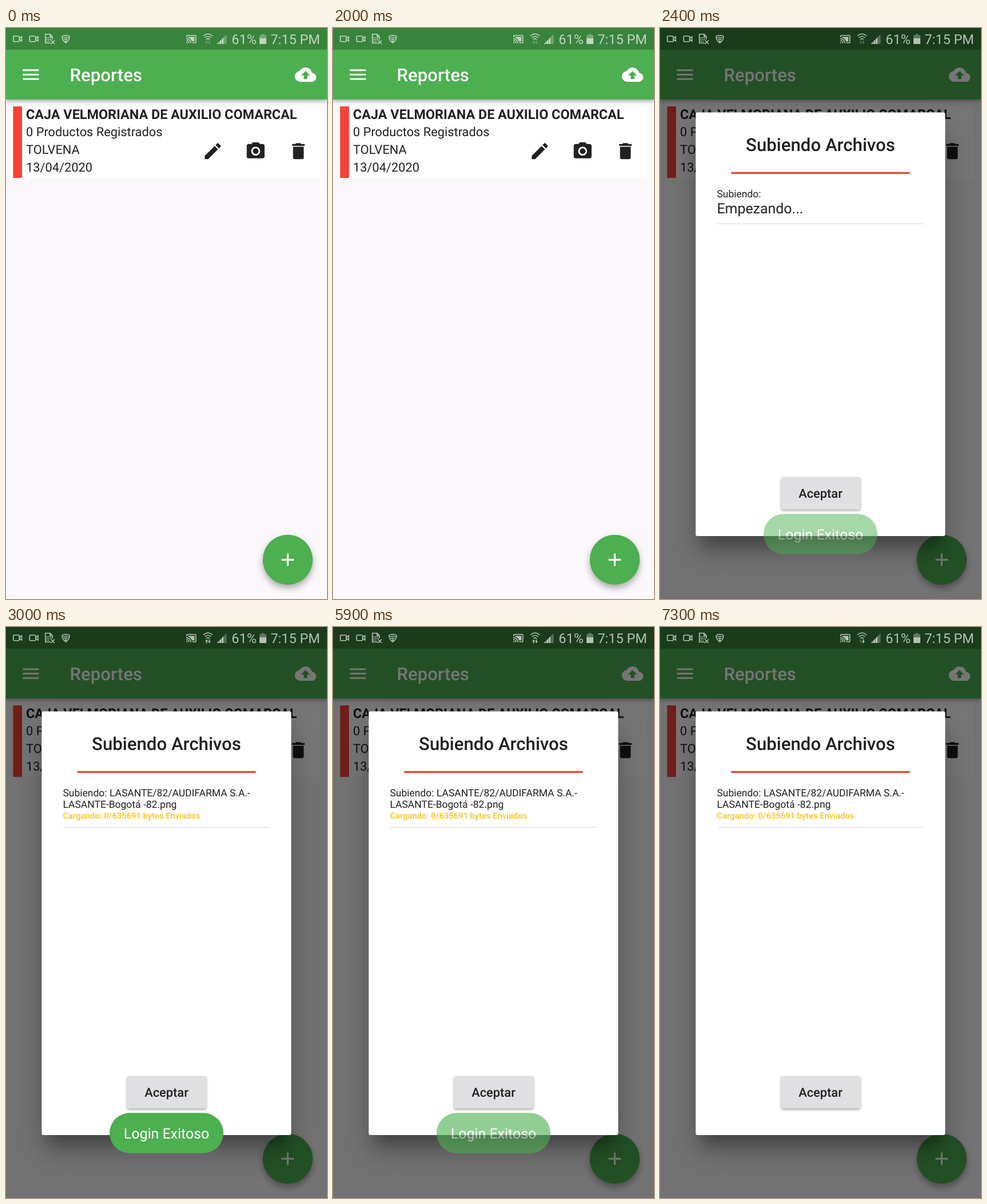
Animation of 561x998 px, one loop 8000 ms. Source, as an HTML page:

```html
<!DOCTYPE html>
<html lang="es">
<head>
<meta charset="utf-8">
<title>Reportes</title>
<style>
  html, body { margin: 0; width: 100%; height: 100%; overflow: hidden; background: #faf8fb; }
  svg { display: block; width: 561px; height: 998px; }
  text { font: 400 21.8px Roboto, sans-serif; fill: #212022; text-rendering: geometricPrecision; }
  .head { font-size: 31.16px; font-weight: 500; }
  .name { font-size: 23.37px; font-weight: 700; }
  .big { font-size: 24.93px; }
  .path { font-size: 17.5px; }
  .bytes { font-size: 14.8px; font-weight: 500; fill: #f9c51f; }
  .action { font-weight: 500; }
  .light, .light text { fill: #fff; }
  .dark { fill: #212022; }
  .status { fill: #fff; opacity: .68; }
  .status text { font-size: 23.5px; fill: #fff; }
  .line { fill: none; stroke: #fff; stroke-width: 1.6; }
  .bar { filter: drop-shadow(0 3px 3px rgba(0, 0, 0, .32)); }
  .fab { filter: drop-shadow(0 6px 6px rgba(0, 0, 0, .32)); }
  .button { filter: drop-shadow(0 2px 2px rgba(0, 0, 0, .36)); }

  /* 1.25% of the loop is 100 ms */
  .modal, .start, .upload, .toast, .ripple, .up, .down {
    opacity: 0;
    animation: 8s step-end infinite;
  }
  .modal { animation-name: modal; }
  .start { animation-name: start; }
  .upload { animation-name: upload; }
  .toast { animation-name: toast; }
  .ripple { animation-name: ripple; }
  .up { animation-name: up; }
  .down { animation-name: down; }
  @keyframes modal { 0% { opacity: 0 } 26.25%, 100% { opacity: 1 } }
  @keyframes start { 0% { opacity: 1 } 31.25%, 100% { opacity: 0 } }
  @keyframes upload { 0% { opacity: 0 } 31.25%, 100% { opacity: 1 } }
  @keyframes ripple {
    0% { opacity: 0 } 26.25% { opacity: .12 } 27.5% { opacity: .06 } 28.75%, 100% { opacity: 0 }
  }
  @keyframes toast {
    0% { opacity: 0 }
    28.75% { opacity: .2 } 30% { opacity: .5 } 31.25% { opacity: .75 } 32.5% { opacity: .92 } 33.75% { opacity: 1 }
    70% { opacity: .99 } 71.25% { opacity: .92 } 72.5% { opacity: .79 } 73.75% { opacity: .61 }
    75% { opacity: .33 } 76.25%, 100% { opacity: 0 }
  }
  @keyframes up {
    0% { opacity: .35 } 37.5% { opacity: 1 } 62.5% { opacity: .35 } 66.25% { opacity: 1 } 80%, 100% { opacity: .35 }
  }
  @keyframes down { 0% { opacity: .35 } 37.5%, 100% { opacity: 1 } }
</style>
</head>
<body>
<svg viewBox="0 0 561 998">
  <defs>
    <filter id="soft" x="-30%" y="-30%" width="160%" height="160%"><feGaussianBlur stdDeviation="26"/></filter>
    <filter id="near" x="-30%" y="-30%" width="160%" height="160%"><feGaussianBlur stdDeviation="11"/></filter>
    <clipPath id="barClip"><path d="M0 38H561V125H0z"/></clipPath>
    <g id="video">
      <rect class="line" x=".8" y="14.3" width="10.4" height="9.4" rx="1"/>
      <path class="line" d="M11.4 18 15.4 15v8l-4-3"/>
    </g>
  </defs>

  <!-- page -->
  <path fill="#faf8fb" d="M0 0H561V998H0z"/>
  <path class="bar" fill="#4caf50" d="M0 38H561V125H0z"/>
  <path fill="#39843c" d="M0 0H561V38H0z"/>
  <g clip-path="url(#barClip)"><circle class="ripple light" cx="523.5" cy="81.5" r="53"/></g>
  <g class="light">
    <path transform="translate(24.8 62.8) scale(1.558)" d="M3 18h18v-2H3v2zm0-5h18v-2H3v2zm0-7v2h18V6H3z"/>
    <text class="head" x="111.6" y="93">Reportes</text>
    <path transform="translate(504.8 62.8) scale(1.558)" d="M19.35 10.04C18.67 6.59 15.64 4 12 4 9.11 4 6.6 5.64 5.35 8.04 2.34 8.36 0 10.91 0 14c0 3.31 2.69 6 6 6h13c2.76 0 5-2.24 5-5 0-2.64-2.05-4.78-4.65-4.96zM14 13v4h-4v-4H7l5-5 5 5h-3z"/>
  </g>

  <!-- report card -->
  <path fill="#fff" d="M28 137H549V262H28z"/>
  <path fill="#f44336" d="M12.4 137H28V262H12.4z"/>
  <text class="name" x="35" y="159.3">CAJA VELMORIANA DE AUXILIO COMARCAL</text>
  <text x="35" y="189">0 Productos Registrados</text>
  <text x="35" y="220">TOLVENA</text>
  <text x="35" y="251.2">13/04/2020</text>
  <g class="dark">
    <path transform="translate(342.7 196.6) scale(1.558)" d="M3 17.25V21h3.75L17.81 9.94l-3.75-3.75L3 17.25zM20.71 7.04c.39-.39.39-1.02 0-1.41l-2.34-2.34c-.39-.39-1.02-.39-1.41 0l-1.83 1.83 3.75 3.75 1.83-1.83z"/>
    <g transform="translate(417.6 196.6) scale(1.558)">
      <circle cx="12" cy="12" r="3.2"/>
      <path d="M9 2 7.17 4H4c-1.1 0-2 .9-2 2v12c0 1.1.9 2 2 2h16c1.1 0 2-.9 2-2V6c0-1.1-.9-2-2-2h-3.17L15 2H9zm3 15c-2.76 0-5-2.24-5-5s2.24-5 5-5 5 2.24 5 5-2.24 5-5 5z"/>
    </g>
    <path transform="translate(492.3 196.6) scale(1.558)" d="M6 19c0 1.1.9 2 2 2h8c1.1 0 2-.9 2-2V7H6v12zM19 4h-3.5l-1-1h-5l-1 1H5v2h14V4z"/>
  </g>

  <circle class="fab" cx="492.4" cy="929.4" r="43.7" fill="#4caf50"/>
  <path class="light" transform="translate(473.7 910.7) scale(1.558)" d="M19 13h-6v6h-2v-6H5v-2h6V5h2v6h6v2z"/>

  <!-- upload dialog -->
  <g class="modal">
    <path fill-opacity=".54" d="M0 0H561V998H0z"/>
    <rect x="62" y="176" width="437" height="740" opacity=".24" filter="url(#soft)"/>
    <rect x="73" y="176" width="415" height="730" opacity=".22" filter="url(#near)"/>
    <rect x="62.4" y="147.6" width="436" height="740.4" rx="3" fill="#fff"/>
    <text class="head" x="280.5" y="214.5" text-anchor="middle">Subiendo Archivos</text>
    <path fill="#e8432f" d="M124.5 251.8H436.5V255H124.5z"/>
    <g class="start">
      <text class="path" x="99.4" y="295.6">Subiendo:</text>
      <text class="big" x="99.4" y="323.8">Empezando...</text>
      <path fill="#e4e3e5" d="M99.7 341.5H461.3V343H99.7z"/>
    </g>
    <g class="upload">
      <text class="path" x="99.4" y="295.6">Subiendo: LASANTE/82/AUDIFARMA S.A.-</text>
      <text class="path" x="99.4" y="316">LASANTE-Bogotá -82.png</text>
      <text class="bytes" x="99.4" y="334.7">Cargando: 0/635691 bytes Enviados</text>
      <path fill="#e4e3e5" d="M99.7 349.3H461.3V350.8H99.7z"/>
    </g>
    <rect class="button" x="211.8" y="785" width="138.2" height="56.4" rx="3" fill="#e0dfe1"/>
    <text class="action" x="280.5" y="821.4" text-anchor="middle">Aceptar</text>
  </g>

  <g class="toast light">
    <rect x="181" y="849.3" width="199" height="70.5" rx="35.2" fill="#4caf50"/>
    <text class="big" x="280.5" y="894.4" text-anchor="middle">Login Exitoso</text>
  </g>

  <!-- system icons -->
  <g class="status">
    <use href="#video" x="12"/>
    <use href="#video" x="40.5"/>
    <path class="line" d="M78 26.2H68.8V10.8H77L81 14.8V20M77 10.8V15H81"/>
    <path class="line" stroke-dasharray="2.2 1" d="M70.5 17H79M70.5 20H79M70.5 23H77"/>
    <path class="line" d="M78.5 21.5 85 28M85 21.5 78.5 28"/>
    <path class="line" d="M98 14.6Q104.5 11 111 14.6Q111 22 104.5 26Q98 22 98 14.6z"/>
    <path class="line" d="M99.8 17.6Q104.5 14.8 109.2 17.6M101.6 20.3Q104.5 18.4 107.4 20.3"/>
    <circle cx="104.5" cy="22.8" r="1.5"/>
    <path transform="translate(314.2 9.8) scale(.8)" d="M21 3H3c-1.1 0-2 .9-2 2v3h2V5h18v14h-7v2h7c1.1 0 2-.9 2-2V5c0-1.1-.9-2-2-2zM1 18v3h3c0-1.66-1.34-3-3-3zm0-4v2c2.76 0 5 2.24 5 5h2c0-3.87-3.13-7-7-7zm0-4v2c4.97 0 9 4.03 9 9h2c0-6.08-4.93-11-11-11zM19 7H5v1.63c3.96 1.28 7.09 4.41 8.37 8.37H19V7z"/>
    <path class="line" stroke-width="2" d="M345 14Q353 6.5 361 14M347.6 17Q353 12 358.4 17M350 20Q353 17.2 356 20"/>
    <path class="up" d="M350.6 21.5 353 25H351.5V28.5H349.7V25H348.2z"/>
    <path class="down" d="M355.4 28.5 353 25H354.5V21.5H356.3V25H357.8z"/>
    <path opacity=".4" d="M368.5 28 385.5 11V28z"/>
    <path d="M368.5 28 372 24.5V28zM373 28V23.5L376 20.5V28zM377 28V19.5L380 16.5V28z"/>
    <text x="394.3" y="28">61%</text>
    <path opacity=".45" d="M446.5 10.5H451.5V12.5H455V18H443V12.5H446.5z"/>
    <path d="M443 18H455V28H443z"/>
    <text x="462.4" y="28">7:15 PM</text>
  </g>
</svg>
</body>
</html>
```
